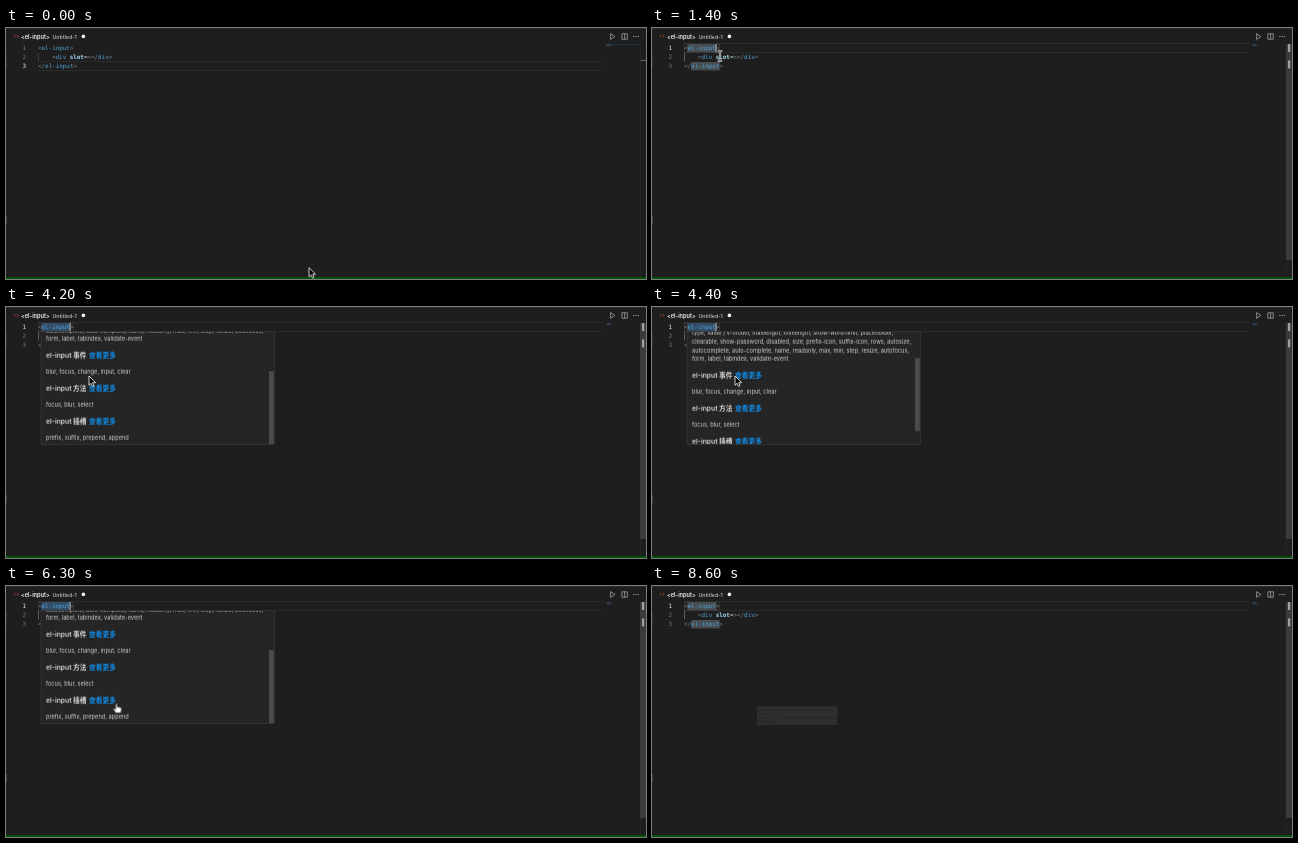
Write an HTML page that moves like this. It is 640 px wide and 251 px high and loops after 8700 ms.

```html
<!DOCTYPE html>
<html lang="zh-CN">
<head>
<meta charset="utf-8">
<title>Editor hover docs</title>
<style>
  html, body { margin: 0; width: 100%; height: 100%; overflow: hidden; background: #1e1e1e; }
  svg { display: block; width: 100%; height: 100%; }
  text { white-space: pre; }

  .ui { font-family: Inter, "Noto Sans CJK SC", "Noto Sans CJK", sans-serif; }
  .code { font: 5.9px "DejaVu Sans Mono", monospace; fill: #75858f; }
  .tag { fill: #4fa3d8; }
  .attr { fill: #a8e0fb; font-weight: bold; }
  .num { fill: #777; }
  .num.on { fill: #c6c6c6; }
  .line { fill: none; stroke: #2a2a2a; stroke-width: 1; }
  .word { fill: #484d51; }
  .bracket { fill: none; stroke: #888; stroke-opacity: .5; stroke-width: .4; }

  .doc { font-size: 5.7px; fill: #d0d0d0; }
  .doc .h { font-size: 6.75px; font-weight: 600; fill: #d8d8d8; }
  .doc .link { fill: #1190ee; }
  .tip { font-size: 3.5px; fill: #3a3438; }

  /* One shared 8.7 s clock */
  .before, .after, .words, .caret, .popup, .tint, .bar, .slider, .scroll, .thumb,
  .tip, .cursor, .arrow, .beam, .hand { animation: 8.7s linear infinite; }

  .before { animation-name: before; animation-timing-function: step-end; }
  .after { animation-name: after; animation-timing-function: step-end; }
  .words { animation-name: words; animation-timing-function: step-end; }
  .caret { animation-name: caret; animation-timing-function: step-end; }
  .arrow { animation-name: arrow; animation-timing-function: step-end; }
  .beam { animation-name: beam; animation-timing-function: step-end; }
  .hand { animation-name: hand; animation-timing-function: step-end; }
  .popup, .tint { animation-name: popup; }
  .bar { animation-name: bar; }
  .slider { animation-name: slider; }
  .scroll { --end: -59.3px; animation-name: scroll; }
  .thumb { --end: 39px; animation-name: scroll; }
  .tip { animation-name: tip; }
  .cursor { animation-name: cursor; }

  @keyframes before { 0% { opacity: 1 } 11.49%, 100% { opacity: 0 } }
  @keyframes after { 0% { opacity: 0 } 11.49%, 100% { opacity: 1 } }
  @keyframes words { 0% { opacity: 0 } 13.79%, 100% { opacity: 1 } }
  @keyframes caret {
    0%, 17.24%, 28.73%, 40.22%, 51.72%, 63.21%, 74.71%, 86.2%, 97.7%, 100% { opacity: 0 }
    11.49%, 22.98%, 34.48%, 45.97%, 57.47%, 68.96%, 80.45%, 91.95% { opacity: 1 }
  }
  @keyframes arrow {
    0%, 39.08%, 91.95% { opacity: 1 }
    1.14%, 71.26%, 93.1%, 100% { opacity: 0 }
  }
  @keyframes beam {
    0%, 39.08% { opacity: 0 }
    1.14%, 93.1%, 100% { opacity: 1 }
  }
  @keyframes hand {
    0%, 91.95%, 100% { opacity: 0 }
    71.26% { opacity: 1 }
  }
  @keyframes popup {
    0%, 16.6% { opacity: 0 }
    18.39%, 94.25% { opacity: 1 }
    96.55%, 100% { opacity: 0 }
  }
  @keyframes bar { 0%, 39.08% { opacity: 0 } 41.37%, 100% { opacity: 1 } }
  @keyframes slider { 0%, 1.14% { opacity: 0 } 3.45%, 100% { opacity: 1 } }
  @keyframes scroll {
    0%, 45.4% { transform: translateY(0) }
    48.27%, 49.42% { transform: translateY(var(--end)) }
    52.87%, 61.5% { transform: translateY(0) }
    66.66%, 100% { transform: translateY(var(--end)) }
  }
  @keyframes tip {
    0%, 88.9% { opacity: 0 }
    89.65% { opacity: .9 }
    90.8%, 95.4% { opacity: 1 }
    98.85% { opacity: .1 }
    100% { opacity: 0 }
  }
  @keyframes cursor {
    0% { transform: translate(303px, 239.6px) }
    1.14% { transform: translate(303px, 239.6px); animation-timing-function: steps(9) }
    11.49% { transform: translate(65px, 21px); animation-timing-function: steps(4) }
    16.09% { transform: translate(68px, 28px); animation-timing-function: steps(2) }
    18.39% { transform: translate(61px, 17px) }
    37.93% { transform: translate(61px, 17px); animation-timing-function: steps(5) }
    43.67% { transform: translate(83px, 69px) }
    57.47% { transform: translate(83px, 69px); animation-timing-function: steps(3) }
    60.91% { transform: translate(92px, 66px) }
    67.81% { transform: translate(92px, 66px); animation-timing-function: steps(4) }
    72.41%, 74.71% { transform: translate(110.5px, 117.5px) }
    75.86% { transform: translate(110px, 117px) }
    90.8% { transform: translate(110px, 117px); animation-timing-function: steps(6) }
    97.7%, 100% { transform: translate(341px, 262px) }
  }
</style>
</head>
<body>
<svg viewBox="0 0 640 251" preserveAspectRatio="none">
  <defs>
    <clipPath id="page"><rect x="35" y="25" width="233" height="112"/></clipPath>
  </defs>
  <rect width="640" height="251" fill="#1e1e1e"/>
  <rect width="640" height=".8" fill="#2c2c2c"/>
  <rect y="26" width=".8" height="14" fill="#333"/>
  <rect y="188" width="1" height="8" fill="#444"/>
  <rect y="249" width="640" height="2" fill="#04500a"/>

  <!-- Title bar -->
  <g class="ui">
    <path d="M9.4 6.9 8 8.3l1.4 1.4M10.9 6.9 12.3 8.3l-1.4 1.4" fill="none" stroke="#b34a38" stroke-width=".8"/>
    <text x="15" y="10.5" font-size="5.6" font-weight="600" fill="#f4f4f4">&lt;el-input&gt;</text>
    <text x="46.4" y="10.5" font-size="5.3" font-weight="500" fill="#c4c4c4">Untitled-1</text>
    <circle cx="77.4" cy="8.4" r="1.8" fill="#f4f4f4"/>
  </g>
  <g fill="none" stroke="#b4b4b4" stroke-width=".7">
    <path d="M604.6 5.6v5.8l4.3-2.9z"/>
    <path d="M615.9 5.8h5.4v5.4h-5.4zM618.6 5.8v5.4"/>
    <path d="M627.4 8.5h1M629.6 8.5h1M631.8 8.5h1" stroke-width="1"/>
  </g>

  <!-- Active line and word marks -->
  <g class="before">
    <path class="line" d="M32 33.5H597.5M32 42.5H597.5"/>
    <path d="M600 16.5H634" stroke="#20384d" stroke-width=".7"/>
    <rect x="634.5" y="32" width="5.5" height="1" fill="#6e6452"/>
  </g>
  <g class="after">
    <path class="line" d="M32 15.5H597.5M32 24.5H597.5"/>
    <rect class="bracket" x="32.2" y="16" width="3.3" height="8.2"/>
    <rect class="bracket" x="64.2" y="16" width="3.3" height="8.2"/>
  </g>
  <g class="words">
    <rect class="word" x="35.5" y="16" width="28.6" height="8.4"/>
    <rect class="word" x="39.1" y="34" width="28.6" height="8.4"/>
  </g>
  <rect class="tint" x="35.5" y="16" width="28.6" height="8.4" fill="#264f78" fill-opacity=".55"/>

  <!-- Code -->
  <path d="M32.5 25v8.4" stroke="#454545" stroke-width=".7"/>
  <path class="after" d="M32.5 25v8.4" stroke="#707070" stroke-width=".7"/>
  <g class="code">
    <text x="32" y="22">&lt;<tspan class="tag">el-input</tspan>&gt;</text>
    <text x="46" y="31">&lt;<tspan class="tag">div</tspan> <tspan class="attr">slot</tspan><tspan fill="#d4d4d4">=</tspan>&gt;&lt;/<tspan class="tag">div</tspan>&gt;</text>
    <text x="32" y="40">&lt;/<tspan class="tag">el-input</tspan>&gt;</text>
    <text class="num" x="16.6" y="22">1</text>
    <text class="num" x="16.6" y="31">2</text>
    <text class="num" x="16.6" y="40">3</text>
    <text class="num on before" x="16.6" y="40">3</text>
    <text class="num on after" x="16.6" y="22">1</text>
  </g>
  <rect class="caret" x="63.6" y="16" width=".9" height="8.5" fill="#c4c4c0"/>

  <!-- Minimap and scrollbar -->
  <path d="M600 16.4h4M601.5 17.2h4.5M600 18h4.4" stroke="#3f5f7c" stroke-width=".5"/>
  <path d="M634.4 16v233" stroke="#2a2a2a" stroke-width=".7"/>
  <rect class="slider" x="634" y="16" width="6" height="216" fill="#3b3b3b"/>
  <g class="words" fill="#a0a0a0">
    <rect x="636" y="16" width="2.2" height="8"/>
    <rect x="636" y="32.4" width="2.2" height="8"/>
  </g>

  <!-- Hover documentation -->
  <g class="popup ui">
    <rect x="35" y="24.8" width="233.4" height="112.6" fill="#252526" stroke="#3c3c3c" stroke-width=".6"/>
    <g clip-path="url(#page)">
      <g class="scroll doc">
        <text x="40" y="33">当前查看的标签为：el-input</text>
        <text class="h" y="50.4"><tspan x="40">el-input</tspan><tspan x="67">属性</tspan><tspan class="link" x="83">查看更多</tspan></text>
        <text x="40" y="67">type, value / v-model, maxlength, minlength, show-word-limit, placeholder,</text>
        <text x="40" y="75.8">clearable, show-password, disabled, size, prefix-icon, suffix-icon, rows, autosize,</text>
        <text x="40" y="84.5">autocomplete, auto-complete, name, readonly, max, min, step, resize, autofocus,</text>
        <text x="40" y="93.3">form, label, tabindex, validate-event</text>
        <text class="h" y="110.2"><tspan x="40">el-input</tspan><tspan x="67">事件</tspan><tspan class="link" x="83">查看更多</tspan></text>
        <text x="40" y="126.4">blur, focus, change, input, clear</text>
        <text class="h" y="143"><tspan x="40">el-input</tspan><tspan x="67">方法</tspan><tspan class="link" x="83">查看更多</tspan></text>
        <text x="40" y="159.4">focus, blur, select</text>
        <text class="h" y="176"><tspan x="40">el-input</tspan><tspan x="67">插槽</tspan><tspan class="link" x="83">查看更多</tspan></text>
        <text x="40" y="192.4">prefix, suffix, prepend, append</text>
      </g>
      <g class="bar"><rect class="thumb" x="263" y="25.2" width="4.8" height="73" fill="#4b4b4b"/></g>
    </g>
  </g>

  <!-- Link tooltip -->
  <g class="tip ui">
    <rect x="105" y="120.3" width="80.4" height="18.6" fill="#d0c8cd"/>
    <text x="106.6" y="124.6">command:element-ui-doc-tooltip.openElem?</text>
    <text x="106.6" y="128.8">%5B%22el-</text>
    <text x="106.6" y="133">input%22%2C%22%E6%8F%92%E6%A7%BD</text>
    <text x="106.6" y="137.2">%22%5D</text>
  </g>

  <!-- Mouse pointer -->
  <g class="cursor" stroke-linejoin="round">
    <path class="arrow" d="M0 0V9.2L2.1 7.3 3.5 10.4 5 9.7 3.7 6.7H6.6Z" fill="#000" stroke="#fff" stroke-width=".8"/>
    <g class="beam" fill="none">
      <path d="M-2.2-5Q0-5 0-3.6Q0-5 2.2-5M0-3.6V3.6M-2.2 5Q0 5 0 3.6Q0 5 2.2 5" stroke="#eee" stroke-width="1.9"/>
      <path d="M-2-5Q0-5 0-3.6Q0-5 2-5M0-3.6V3.6M-2 5Q0 5 0 3.6Q0 5 2 5" stroke="#111" stroke-width=".7"/>
    </g>
    <path class="hand" d="M-.9.8Q0-.6.9.8V3.6Q1.8 2.9 2.4 3.8Q3.3 3.2 3.8 4.2Q5 3.8 5 5.2V6.8Q4.8 8 4 9.4H-.7Q-2 7.6-3.2 5.8Q-3 4.4-1.9 5L-.9 6Z" fill="#fff" stroke="#111" stroke-width=".6"/>
  </g>
</svg>
</body>
</html>
```
